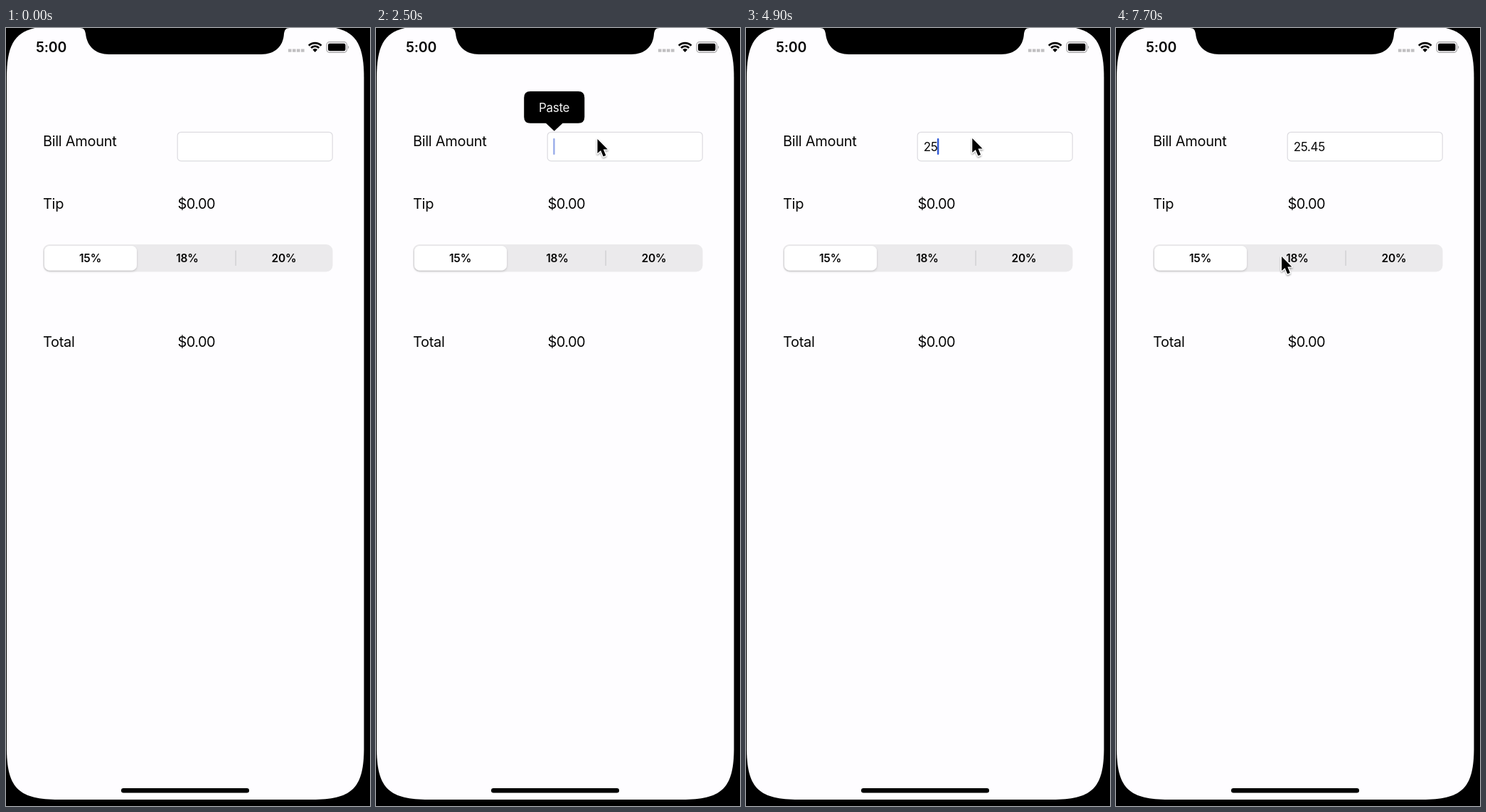
An HTML page for the animation above (8 s loop, 512 by 1093 pixels).

```html
<!DOCTYPE html>
<html lang="en">
<head>
<meta charset="utf-8">
<title>Tip calculator</title>
<style>
  html, body { margin: 0; width: 100%; height: 100%; overflow: hidden; background: #000; }
  svg { display: block; width: 100vw; height: 100vh; }
  text { font-family: Inter, Roboto, sans-serif; fill: #060606; }
  .label { font-size: 20px; letter-spacing: -.3px; }
  .money { font-size: 20px; letter-spacing: -.6px; }
  .input { font-size: 17px; letter-spacing: -.35px; }
  .clock { font-size: 19.5px; font-weight: 600; letter-spacing: -.2px; }
  .segment { font-size: 15.5px; font-weight: 600; letter-spacing: -.2px; text-anchor: middle; }
  .menu { font-size: 17px; letter-spacing: -.3px; text-anchor: middle; fill: #f2f2f2; }
</style>
</head>
<body>
<svg viewBox="0 0 512 1093">
  <defs>
    <filter id="soft" x="-20%" y="-30%" width="140%" height="170%">
      <feDropShadow dx="0" dy="1.5" stdDeviation="1.6" flood-opacity=".18"/>
    </filter>
    <filter id="arrowShadow" x="-50%" y="-30%" width="200%" height="170%">
      <feDropShadow dx="0" dy="1.5" stdDeviation="1.3" flood-opacity=".4"/>
    </filter>
  </defs>

  <!-- screen, notch, home bar -->
  <path fill="#fefdff" d="M74 -3H430.5c56.6 0 73 16.4 73 73V1011c0 56.6 -16.4 73 -73 73H74c-56.6 0 -73 -16.4 -73 -73V70c0 -56.6 16.4 -73 73 -73Z"/>
  <path d="M104 -3V0C110 0 111 3 112 8C114 26 126 37 145 37H359C378 37 390 26 391 8C392 3 393 0 399 0V-3Z"/>
  <rect x="162" y="1068" width="180" height="6.5" rx="3.2"/>

  <!-- status bar -->
  <text class="clock" x="42" y="34">5:00</text>
  <path d="M397 31.7H419.6" stroke="#c1c0c2" stroke-width="4.3" stroke-dasharray="4.6 1.4"/>
  <g fill="none" stroke="#000" stroke-width="2.8">
    <path d="M425.9 24.7A12.5 12.5 0 0 1 443.5 24.7"/>
    <path d="M429.1 27.9A7.9 7.9 0 0 1 440.3 27.9"/>
  </g>
  <path d="M434.7 34L431.4 30.4A4.7 4.7 0 0 1 438 30.4Z"/>
  <rect x="451" y="19.7" width="28.5" height="14.6" rx="4" fill="none" stroke="#a3a2a4" stroke-width="1.2"/>
  <rect x="453" y="21.7" width="24.5" height="10.6" rx="2.3"/>
  <path d="M481 24.5Q483.6 27 481 29.5Z" fill="#a3a2a4"/>

  <!-- form -->
  <text class="label" x="52" y="166">Bill Amount</text>
  <text class="label" x="52" y="253.5">Tip</text>
  <text class="label" x="52" y="447.5">Total</text>
  <text class="money" x="241.5" y="253.5">$0.00</text>
  <text class="money" x="241.5" y="447.5">$0.00</text>
  <rect x="241.2" y="146.3" width="218" height="40.6" rx="5" fill="#fff" stroke="#dcdbe0" stroke-width="1.2"/>
  <text class="input" id="amount" x="249.7" y="173"></text>
  <rect id="caret" y="155" width="2.4" height="23" rx="1" fill="#3159d6"/>

  <rect x="52" y="304" width="407.5" height="38.5" rx="9" fill="#ebeaec"/>
  <rect x="54" y="306" width="130" height="34.5" rx="7.5" fill="#fff" filter="url(#soft)"/>
  <rect x="322.5" y="312.5" width="1.2" height="21.5" fill="#cbcacd"/>
  <text class="segment" x="118.5" y="329">15%</text>
  <text class="segment" x="255" y="329">18%</text>
  <text class="segment" x="391" y="329">20%</text>

  <!-- edit menu -->
  <path id="bubble" d="M217 89H284.5Q293.3 89 293.3 98V125Q293.3 133.7 284.5 133.7H262.5L250.8 144.7L239 133.7H217Q208.2 133.7 208.2 125V98Q208.2 89 217 89Z"/>
  <text class="menu" id="paste" x="250.5" y="117.5">Paste</text>

  <g id="arrow" filter="url(#arrowShadow)">
    <path d="M0 0V20L4.6 15.9L8.2 24.6L11.8 23L8.3 14.5H14.3Z" stroke="#fff" stroke-width="2.4" paint-order="stroke" stroke-linejoin="round"/>
  </g>
</svg>

<script>
  const LOOP = 8000, TICK = 100, ENTER = 200;
  const [amount, caret, bubble, paste, arrow] =
    ['amount', 'caret', 'bubble', 'paste', 'arrow'].map(id => document.getElementById(id));

  const clamp = v => Math.min(1, Math.max(0, v));
  const linear = k => k;
  const easeOut = k => 1 - (1 - k) ** 2;
  const easeInOut = k => k * k * (3 - 2 * k);

  // The pointer glides from one resting place to the next.
  const home = { x: 418, y: 641 };
  const glides = [
    { from: ENTER, to: 800, x: 300, y: 135, ease: easeOut },
    { from: 800, to: 1300, x: 309.5, y: 155, ease: easeInOut },
    { from: 2300, to: 2700, x: 313.5, y: 157, ease: linear },
    { from: 3900, to: 4200, x: 316.5, y: 156, ease: linear },
    { from: 4800, to: 5300, x: 325.5, y: 151, ease: linear },
    { from: 6800, to: 7700, x: 233, y: 321, ease: easeInOut }
  ];

  function pointerAt(t) {
    let { x, y } = home;
    for (const g of glides) {
      const k = g.ease(clamp((t - g.from) / (g.to - g.from)));
      x += (g.x - x) * k;
      y += (g.y - y) * k;
    }
    return `translate(${x} ${y})`;
  }

  // Opacity that rises from `on` and falls from `off`, each over `ramp` ms.
  const fade = (t, on, off, ramp) => clamp((t - on) / ramp) * (1 - clamp((t - off) / ramp));

  const caretAt = t =>
    fade(t, 600, 1050, 300) + fade(t, 1600, 2350, 300) + fade(t, 2900, 6500, 200);

  // Keys come in pairs, one pair each second.
  const keyTime = i => 4000 + 1000 * Math.floor(i / 2) + 700 * (i % 2);
  const typedAt = t => [...'25.45'].filter((_, i) => keyTime(i) <= t).join('');

  function draw(now) {
    const t = Math.floor(now % LOOP / TICK) * TICK;
    arrow.setAttribute('transform', pointerAt(t));
    arrow.setAttribute('opacity', t < ENTER ? 0 : 1);

    const typed = typedAt(t);
    amount.textContent = typed;
    caret.setAttribute('x', 249.2 + (typed && amount.getComputedTextLength()));
    caret.setAttribute('opacity', caretAt(t));

    const menu = fade(t, 1730, 4350, 160);
    bubble.setAttribute('opacity', menu);
    paste.setAttribute('opacity', menu * (1 + menu) / 2);
  }

  const start = performance.now();
  function frame() {
    draw(performance.now() - start);
    requestAnimationFrame(frame);
  }
  frame();
</script>
</body>
</html>
```
